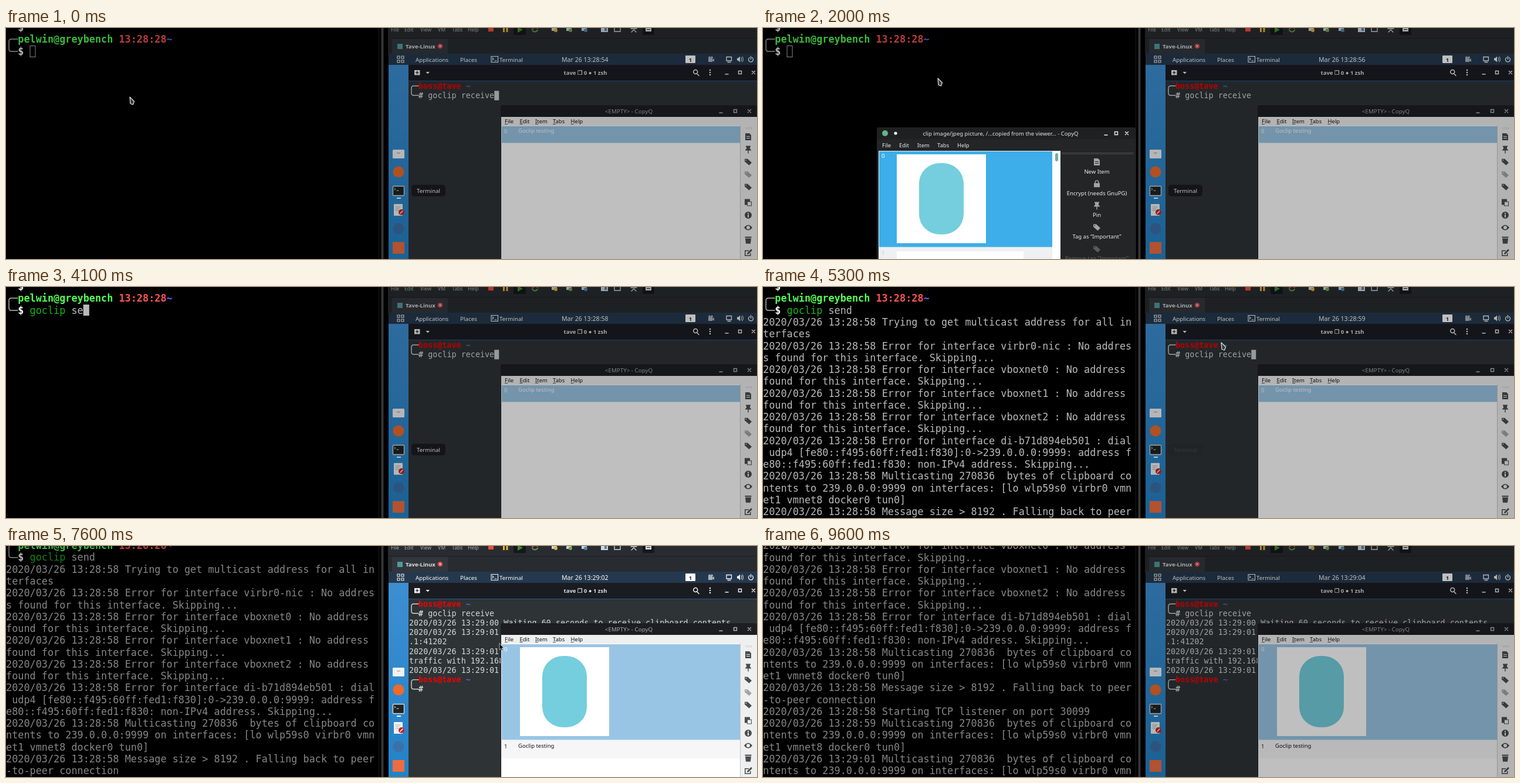
Recreate the animation shown at these times as an HTML page. Size 1280x395 px, loop 9.7 s.

```html
<!DOCTYPE html>
<html lang="en">
<head>
<meta charset="utf-8">
<title>Clipboard over the network</title>
<style>
html, body { margin: 0; width: 100%; height: 100%; overflow: hidden; background: #000; }
svg { display: block; width: 1280px; height: 395px; }
text { white-space: pre; font: 9.5px "Noto Sans", sans-serif; }
.term { font: 16.83px "DejaVu Sans Mono", monospace; fill: #b9b9b9; }
.guest { font: 13.4px "DejaVu Sans Mono", monospace; fill: #d3d7d8; }
.b { font-weight: bold; }
.mid { text-anchor: middle; }
.vm { font-size: 8.7px; fill: #a9adb0; }
.bar { font-size: 9.8px; fill: #fff; }
.clock { font-size: 10.6px; fill: #fff; }
.line { fill: none; stroke-linecap: round; }
</style>
</head>
<body>
<svg viewBox="0 0 1280 395">
  <defs>
    <linearGradient id="dock" x2="0" y2="1">
      <stop offset="0" stop-color="#3d8ed2"/><stop offset="1" stop-color="#2382c6"/>
    </linearGradient>
    <clipPath id="left"><path d="M0 0H636V395H0Z"/></clipPath>
  </defs>
  <rect width="1280" height="395"/>
  <g clip-path="url(#left)">
    <g id="term"></g>
    <rect id="dimL" width="637" height="395"/>
  </g>
  <path d="M635.5 0V395" stroke="#1c1c1c"/>
  <path d="M641.5 0V395" stroke="#363636" stroke-width="4"/>
  <g id="vm"></g>
  <rect id="dimR" x="651" width="629" height="395"/>
  <g id="popup"></g>
  <g id="shards"></g>
  <path id="arrow" stroke-linejoin="round"/>
</svg>
<script>
const $ = id => document.getElementById(id);
const esc = s => s.replace(/&/g, "&amp;").replace(/</g, "&lt;");
const txt = (x, y, s, cls = "", fill = "", id = "") =>
  `<text x="${x}" y="${y}" class="${cls}"${id && ` id="${id}"`}${fill && ` style="fill:${fill}"`}>${esc(s)}</text>`;
const box = (x, y, w, h, fill, more = "") =>
  `<rect x="${x}" y="${y}" width="${w}" height="${h}" fill="${fill}" ${more}/>`;
const dot = (x, y, r, fill) => `<circle cx="${x}" cy="${y}" r="${r}" fill="${fill}"/>`;
const line = (d, stroke, w = 1.3) => `<path class="line" d="${d}" stroke="${stroke}" stroke-width="${w}"/>`;
const shape = (d, fill) => `<path d="${d}" fill="${fill}" fill-rule="evenodd"/>`;
const row = (names, xs, y, cls, fill) => names.map((n, i) => txt(xs[i], y, n, cls, fill)).join("");

const MENU = ["File", "Edit", "Item", "Tabs", "Help"];
const picture = (x, y) => box(x, y, 152, 152, "#fff") + box(x + 38, y + 15, 76, 122, "#74cedd", 'rx="35"');
const winButtons = (xs, y, c) =>
  line(`M${xs[0] - 3} ${y + 3}h5`, c, 1.6) +
  line(`M${xs[1] - 2.5} ${y - 2.5}h5v5h-5z`, c, 1.4) +
  line(`M${xs[2] - 2.5} ${y - 2.5}l5 5m0 -5l-5 5`, c, 1.4);

// icons drawn around 0,0
const ICONS = {
  doc: "M-5 -6H2L5 -3V6H-5ZM-3 -1H3V0H-3ZM-3 2H3V3H-3Z",
  pin: "M-4 -6H4V-4H3V-1L5 1V2H.7V7H-.7V2H-5V1L-3 -1V-4H-4Z",
  tag: "M-6 -5H-1L6 1.5L1.5 6L-6 -.5ZM-4.5 -3.5V-2H-3V-3.5Z",
  lock: "M-5 -1H-3.5V-3C-3.5 -7 3.5 -7 3.5 -3V-1H5V6H-5ZM-2 -1H2V-3C2 -5 -2 -5 -2 -3Z",
  paste: "M-6 -6H3V-2H6V6H-2V4H-6ZM-1 -1V5H5V-1Z",
  info: "M-6 0A6 6 0 1 1 6 0A6 6 0 1 1 -6 0ZM-1 -4H1V-2H-1ZM-1 -1H1V4H-1Z",
  eye: "M-7 0Q0 -9 7 0Q0 9 -7 0ZM-3 0A3 3 0 1 0 3 0A3 3 0 1 0 -3 0Z",
  bin: "M-5.5 -6H5.5V-4H-5.5ZM-5 -3H5L4 6H-4Z",
  edit: "M-6 -4H1V-2.5H-4.5V4.5H3V1H4.5V6H-6ZM-2 3L-1.5 .5L5 -6L7 -4L.5 2.5Z",
};
const icon = (name, x, y, fill) => `<g transform="translate(${x} ${y})">${shape(ICONS[name], fill)}</g>`;
const bracket = (x, y, w, h, r, c) =>
  line(`M${x + w} ${y}H${x + r}Q${x} ${y} ${x} ${y + r}V${y + h - r}Q${x} ${y + h} ${x + r} ${y + h}H${x + w}`, c, 1.4);

// left terminal
const CH = 10.13, LH = 20.25;
const S = "2020/03/26 13:28:58 ";
const skip = n => [S + `Error for interface ${n} : No address`, "found for this interface. Skipping..."];
const cast = when => [`2020/03/26 ${when} Multicasting 270836  bytes of clipboard co`,
  "ntents to 239.0.0.0:9999 on interfaces: [lo wlp59s0 virbr0 vmn", "et1 vmnet8 docker0 tun0]"];
const LOG = [
  S + "Trying to get multicast address for all in", "terfaces",
  S + "Error for interface virbr0-nic : No addres", "s found for this interface. Skipping...",
  ...skip("vboxnet0"), ...skip("vboxnet1"), ...skip("vboxnet2"),
  S + "Error for interface di-b71d894eb501 : dial", " udp4 [fe80::f495:60ff:fed1:f830]:0->239.0.0.0:9999: address f",
  "e80::f495:60ff:fed1:f830: non-IPv4 address. Skipping...",
  ...cast("13:28:58"),
  S + "Message size > 8192 . Falling back to peer", "-to-peer connection",
  S + "Starting TCP listener on port 30099",
  ...cast("13:28:59"), ...cast("13:29:01"),
];
$("term").innerHTML =
  txt(2 * CH, 5, "$", "term b", "#fff") + bracket(5, 19, 15, 21, 4, "#b9b9b9") +
  txt(2 * CH, 25, "pelwin@greybench", "term b", "#54ff54") +
  txt(19 * CH, 25, "13:28:28", "term b", "#ff5454") + txt(27 * CH, 25, "~", "term b", "#5c6cff") +
  txt(2 * CH, 45.5, "$", "term b", "#fff") +
  txt(4 * CH, 45.5, "", "term", "", "cmd") + txt(11 * CH, 45.5, "", "term", "", "arg") +
  box(0, 46.5, 0, 1, "#b9b9b9", 'id="under"') + box(0, 30, CH, 19, "#b9b9b9", 'id="caret"') +
  `<g id="log">${LOG.map((s, i) => txt(0, 66 + i * LH, s, "term")).join("")}</g>`;

// right: virtual machine window
const GW = 8.07, GX = 687, gy = r => 103.5 + r * 16.2;
const prompt = r => bracket(691, gy(r) - 4.5, 12, 16.2, 4, "#d3d7d8") +
  txt(703, gy(r), "boss@tave", "guest b", "#f40000") + txt(GX + 12 * GW, gy(r), "~", "guest b", "#3b78c4") +
  txt(703, gy(r + 1), "#", "guest b");
const stamp = "2020/03/26 13:29:0";
const W = "#f4f4f4", G = "#4a4d50";
const MENU_X = [850, 875.5, 902, 932, 962.5];
$("vm").innerHTML =
  box(651, 0, 629, 45, "#282c30") + line("M652 17.5H1280", "#1d2023", 1) +
  row(["File", "Edit", "View", "VM", "Tabs", "Help"], [656, 679, 706, 736, 760, 787], 6, "vm") +
  box(822, -3, 9, 9, "#f04b3c") + box(847, -3, 3, 10, "#eab530") + box(852.5, -3, 3, 10, "#eab530") +
  box(865, -6, 21, 18, "#15181a", 'rx="2"') + shape("M872 -2L881 3L872 8Z", "#3f8a35") +
  line("M897 2Q902 -4 906 1", "#c8463c", 2) + line("M897 4Q901 9 906 4", "#5aa048", 2) +
  [935, 960, 986].map((x, i) => box(x - 5, -3, 9, 8, "#c9d2d8") + dot(x + 2, 4, 3, ["#e0b040", "#75a34f", "#4e87b8"][i])).join("") +
  box(1014, -4, 12, 11, "#d3d8dc") + box(1020, -1, 4, 6, "#4b82b4") +
  line("M1037 -2H1047V6H1037Z", "#d3d8dc") + line("M1066 7L1070 3L1074 7M1065 1H1075", "#d3d8dc") +
  box(1085, -6, 20, 18, "#15181a", 'rx="2"') + box(1090, -3, 10, 9, "#d3d8dc") + box(1092, 2, 6, 1, "#15181a") +
  box(658, 19, 95, 26, "#32373c") + box(667, 27, 9, 9, "#4f9aa0") +
  txt(681, 34.5, "Tave-Linux", "b", "#dfe2e4") + dot(740, 31, 4.3, "#d9484f") + line("M738.5 29.5l3 3m0 -3l-3 3", "#fff", .9) +
  box(652, 44, 628, 19, "#25394e") +
  [0, 1, 2, 3].map(i => line(`M${667 + i % 2 * 7} ${48 + (i >> 1) * 7}h4v4h-4z`, W, 1.1)).join("") +
  row(["Applications", "Places", "Terminal"], [698, 774, 841], 57.5, "bar") +
  line("M827 48.5H838.5V58.5H827ZM829 51l2 2l-2 2M833 56h3", W, 1.1) +
  txt(947, 57.5, "", "clock", "", "clock") +
  box(1158, 47, 17, 13, "#fff", 'rx="1"') + txt(1166.5, 57.5, "1", "b mid", "#222") +
  box(1197, 52, 7, 6, "#aab3bb") + dot(1199, 50.5, 2, "#aab3bb") + dot(1203, 50.5, 2, "#aab3bb") + shape("M1204 54l3 -2v6l-3 -2z", "#aab3bb") +
  line("M1228 49.5H1236.5V56H1228ZM1230 58.5h5", W) + shape("M1246 51.5h2l3 -3v10l-3 -3h-2z", W) + line("M1253 50.5q2 3 0 6M1255 49q3 4.5 0 9", W, 1) +
  line("M1267.5 50.5A4 4 0 1 0 1271.5 50.5M1269.5 48.5v5", W) +
  box(652, 63, 34, 332, "url(#dock)") +
  box(659, 208, 20, 15, "#f1f3f4", 'rx="1.5"') + box(666, 213, 6, 1.5, "#a9b0b5") + dot(669, 246, 9.5, "#ee6a2c") +
  box(659.5, 270.5, 19, 16, "#1f2324", 'rx="1" stroke="#d6dadb" stroke-width="1.3"') + line("M662 274l2 1.5l-2 1.5M666 278h3", W, .9) +
  box(666, 290, 7, 2, "#fff") +
  box(661, 301, 15, 20, "#f3f3f3", 'rx="1"') + line("M664 306h8M664 309h6M664 312h5", "#aaa", 1) +
  dot(674, 315, 5, "#c62828") + line("M672 317l4 -4", "#fff", 1.4) +
  dot(669, 343, 9.5, "#3c70a8") + box(659, 366, 20, 20, "#ed6d40", 'rx="1"') +
  box(686, 63, 594, 332, "#2e3336") + box(686, 63, 594, 27, "#1b1c22") + box(686, 90, 594, 1, "#25568c") +
  box(696, 72, 9.5, 8.5, W) + line("M700.7 74v4.5M698.5 76.2h4.5", "#1b1c22", 1.2) + shape("M715.5 75h6.5l-3.2 3.5z", W) +
  txt(987.5, 80, "tave ❐ 0 ● 1 zsh", "mid b", "#dedede") +
  line("M1178 78.5l3 3", W, 1.5) + `<circle cx="1175.2" cy="75" r="3.5" fill="none" stroke="${W}" stroke-width="1.5"/>` +
  [72, 76, 80].map(y => dot(1200, y, 1.3, W)).join("") + winButtons([1229, 1251, 1274], 76, W) +
  prompt(0) + txt(GX + 4 * GW, gy(1), "goclip receive", "guest") +
  `<g id="wait">${txt(GX, gy(2), stamp + "0 Waiting 60 seconds to receive clipboard contents.", "guest")}</g>` +
  `<g id="recv">${[stamp + "1", ".1:41202", stamp + "1", "traffic with 192.168", stamp + "1"].map((s, i) => txt(GX, gy(3 + i), s, "guest")).join("")}${prompt(8)}</g>` +
  box(0, 0, 8, 16.2, "#c9cdce", 'id="block"') +
  `<g id="tip">${box(691, 268, 58, 20, "#1a1c20", 'rx="5"')}${txt(720, 281.5, "Terminal", "bar mid")}</g>` +
  // clipboard manager inside the guest
  box(843, 132, 437, 263, "#1c1e22", 'rx="3"') + txt(1061.5, 146, "<EMPTY> - CopyQ", "bar mid", "#a9abae") +
  winButtons([1219, 1243, 1267], 142, "#b4b6b8") +
  box(844, 152, 436, 243, "#efefef") + row(MENU, MENU_X, 162.5, "", "#111") +
  MENU_X.map(x => box(x, 164, 5, .8, "#333")).join("") +
  box(845, 167, 406, 228, "#fff") + box(845, 168, 406, 28.5, "#99c5e4", 'id="sel"') +
  txt(849, 180, "0", "", "#fff") +
  `<g id="one">${txt(873, 178.5, "Goclip testing", "", "#fff")}</g>` +
  `<g id="two">${picture(876, 173)}${box(845, 332, 406, 31, "#f6f6f6")}${txt(849, 346, "1", "", "#222")}${txt(873, 345, "Goclip testing", "", "#111")}</g>` +
  line("M1251.5 167V395", "#c4c4c4", 1) +
  [0, 1, 2, 3].map(i => box(1261 + i * 3, 170, 1, 1, "#aaa") + box(1261 + i * 3, 172, 1, 1, "#aaa")).join("") +
  ["doc", "pin", "tag", "tag", "tag", "paste", "info", "eye", "bin", "edit"].map((n, i) =>
    icon(n, 1265, 186 + i * 21.4 + (i > 4 ? 5.5 : 0), i == 3 ? "#a3a5a6" : G)).join("");

// left clipboard manager popup
$("popup").innerHTML =
  box(194, 170, 441, 230, "#232526", 'rx="3"') + box(194, 170, 441, 20, "#1f2021", 'rx="3"') +
  dot(208, 180, 5, "#63b58c") + dot(226, 180, 2.6, "#fff") +
  txt(405, 183.5, "clip image/jpeg picture, /...copied from the viewer... - CopyQ", "mid", "#e6e6e6") +
  winButtons([585, 602, 620], 180, "#f0f0f0") + row(MENU, [203, 232, 263, 297, 331], 203.5, "", "#eee") +
  box(197, 210, 310, 190, "#eff0f1") + box(198, 211, 295, 163.5, "#3daee9") + txt(202, 222, "0", "", "#fff") +
  picture(228, 216) + box(493, 210, 14, 190, "#fff") + box(498, 214, 5, 14, "#6cb0aa", 'rx="2.5"') +
  txt(202, 388, "1", "", "#c4c4c4") + box(228, 382, 216, 20, "#fff") +
  line("M509 213.5H631M509 215.5H631", "#48494a", 1) +
  [["doc", "New Item"], ["lock", "Encrypt (needs GnuPG)"], ["pin", "Pin"], ["tag", "Tag as “Important”"], ["tag", "Remove tag “Important”"]]
    .map(([n, s], i) => icon(n, 569, 229 + i * 37.2, i > 3 ? "#5a5b5c" : "#a2a3a4") +
      txt(569, 248.5 + i * 37.2, s, "mid", i > 3 ? "#5d5e5f" : "#eee")).join("");

// popup shards: x, y, turn, colour, then optional width, height, label
const DARK = "#24272a", BLUE = "#6fa3c4", PALE = "#c4cacd";
const shards = [
  [680, 76, 20, PALE, 26, 12], [877, 20, 5, PALE, 14], [854, 76, 8, PALE, 26, 12], [755, 120, 0, BLUE],
  [843, 206, 20, DARK], [821, 328, 0, DARK, 14], [834, 328, 0, PALE, 13], [1114, 178, 5, DARK, 26, 26, "Pin"],
  [1143, 213, 25, DARK], [1171, 235, 25, DARK], [1242, 191, 22, DARK], [1013, 256, 42, DARK, 26, 26, "Tag"],
  [1200, 321, -28, DARK], [1113, 356, -42, DARK, 26, 26, "portan"], [912, 363, 25, DARK], [972, 396, 15, DARK],
  [1143, 388, -30, DARK], [856, 357, 0, DARK], [672, 358, 30, PALE, 26, 12], [1100, 92, 35, DARK],
];
$("shards").innerHTML = shards.map(([, , , c, w = 26, h = 26, s = ""]) =>
  `<g>${box(-w / 2, -h / 2, w, h, c)}${txt(0, 4, s, "mid", "#ddd")}</g>`).join("");

// timeline helpers: held steps and straight moves
const held = (t, keys) => keys.reduce((v, k) => t >= k[0] ? k[1] : v, keys[0][1]);
const move = (t, keys) => {
  const i = keys.findIndex(k => k[0] > t);
  if (i < 1) return keys[i ? keys.length - 1 : 0].slice(1);
  const [a, b] = [keys[i - 1], keys[i]], u = (t - a[0]) / (b[0] - a[0]);
  return [a[1] + (b[1] - a[1]) * u, a[2] + (b[2] - a[2]) * u];
};
const within = (t, a, b) => t >= a && t < b;
const show = (id, on) => $(id).style.display = on ? "" : "none";
const set = (id, attrs) => { for (const k in attrs) $(id).setAttribute(k, attrs[k]); };

const TICKS = [500, 1600, 3000, 3600, 4600, 5700, 6600, 7600, 8600, 9600];
const PATH = [
  [600, 211, 118], [1100, 290, 240], [1600, 340, 332], [2000, 298, 86], [2100, 298, 86], [2300, 376, 42],
  [5100, 376, 42], [5300, 781, 95], [7200, 781, 95], [8100, 916, 256], [8300, 917, 258], [8600, 917, 258],
  [8800, 860, 230], [9000, 860, 230], [9600, 33, -8],
];
const HOST = "M0 0L7.5 7.5L5.5 13L1 11.5Z", GUEST = "M0 0V11L2.5 8.8L4.3 12.5L6 11.7L4.3 8H7.5Z";

function draw(t) {
  const sec = 54 + TICKS.filter(k => t >= k).length;
  $("clock").textContent = `Mar 26 13:${28 + Math.floor(sec / 60)}:${String(sec % 60).padStart(2, "0")}`;
  $("dimL").style.opacity = held(t, [[0, .28], [2200, .14], [2300, 0], [5500, .14], [5700, .28]]);
  $("dimR").style.opacity = held(t, [[0, .25], [5500, .12], [5700, 0], [9300, .08], [9400, .17], [9500, .25]]);

  // typing and output
  const n = held(t, [[0, 0], [3000, 3], [3100, 4], [3200, 5], [3600, 6], [3900, 7], [4100, 9], [4200, 10], [4400, 11]]);
  $("cmd").textContent = "goclip".slice(0, n);
  $("cmd").style.fill = n > 5 ? "#18b218" : "";
  $("arg").textContent = "send".slice(0, Math.max(0, n - 7));
  set("under", { x: 4 * CH, width: n < 6 ? n * CH : 0 });
  set("caret", t >= 2300 ? { x: (4 + n) * CH, y: 30, width: CH, fill: "#b9b9b9", stroke: "none" }
    : { x: 41, y: 30.5, width: 9, fill: "none", stroke: "#b9b9b9" });
  show("caret", t < 4400);
  const rows = held(t, [[0, 0], [4400, 2], [4500, 99]]);
  [...$("log").children].forEach((e, i) => e.style.display = i < rows ? "" : "none");
  set("term", { transform: `translate(0 ${-LH * held(t, [[0, 0], [7600, 1], [8600, 4], [9600, 7]])})` });

  // guest
  show("wait", t >= 6500);
  show("recv", t >= 6600);
  const [c, r] = held(t, [[0, [18, 1]], [6500, [0, 3]], [6600, [4, 9]]]);
  set("block", { x: GX + c * GW, y: gy(r) - 12.3 });
  show("block", !within(t, 500, 1100) && !within(t, 1700, 2300) && t < 7100);
  $("tip").style.opacity = held(t, [[0, 1], [5200, .5], [5300, .12], [5500, 0]]);
  const got = t >= 6800;
  show("one", !got);
  show("two", got);
  set("sel", { height: got ? 163.5 : 28.5 });

  // popup opens, closes, then flies apart
  show("popup", within(t, 200, 3000));
  $("popup").style.opacity = held(t, [[0, .25], [300, .6], [400, .9], [500, 1], [2300, .9]]);
  const z = held(t, [[0, .94], [300, .97], [400, .99], [500, 1]]);
  set("popup", { transform: `translate(414 310) scale(${z}) translate(-414 -310)` });
  show("shards", within(t, 3000, 3400));
  const age = (t - 3000) / 100;
  $("shards").style.opacity = .55 - .17 * age;
  [...$("shards").children].forEach((e, i) => {
    const [x, y, turn] = shards[i], k = 1 + .13 * age;
    e.setAttribute("transform", `translate(${418 + (x - 418) * k} ${290 + (y - 290) * k}) rotate(${turn * k})`);
  });

  // pointer
  const [x, y] = move(t, PATH), guest = t > 7000 && x > 650;
  show("arrow", !within(t, 3000, 5100) && !within(t, 5700, 7300));
  set("arrow", { d: guest ? GUEST : HOST, transform: `translate(${x} ${y})`, fill: guest ? "#000" : "#3c3c3c",
    stroke: guest ? "#fff" : "#e4e4e4", "stroke-width": guest ? .7 : 1.2 });
}

// the screen is refreshed ten times a second
const start = performance.now();
function loop() {
  draw(Math.floor((performance.now() - start) % 9700 / 100) * 100);
  requestAnimationFrame(loop);
}
loop();
</script>
</body>
</html>
```
